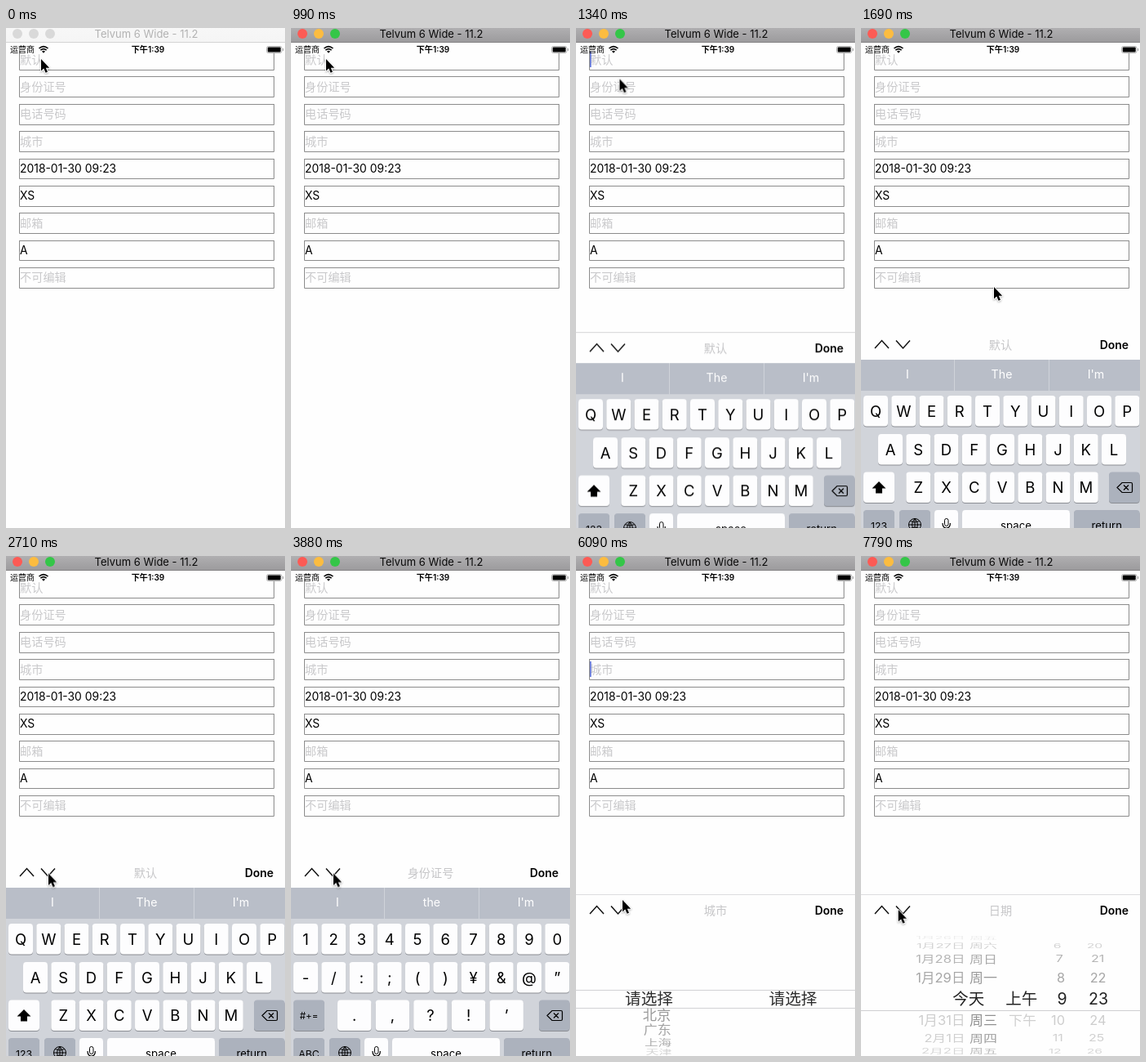
Recreate the animation shown at these times as an HTML page. Size 342 by 612 pixels, loop 8000 ms.

```html
<!DOCTYPE html>
<html lang="zh-CN">
<head>
<meta charset="utf-8">
<title>Form keyboards</title>
<style>
  html, body { margin: 0; width: 100%; height: 100%; overflow: hidden; background: #fff; }
  svg { display: block; width: 342px; height: 612px; overflow: hidden; }
  text { font-family: Inter, "Noto Sans CJK SC", "Noto Sans CJK", sans-serif; white-space: pre; }
</style>
</head>
<body>
<svg id="stage" viewBox="0 0 342 612"></svg>
<script>
const LOOP = 8000;
const stage = document.getElementById('stage');

// ---------- drawing helpers ----------
function add(parent, tag, attrs = {}) {
  const node = document.createElementNS('http://www.w3.org/2000/svg', tag);
  for (const key in attrs) node.setAttribute(key, attrs[key]);
  parent.appendChild(node);
  return node;
}
const group = (parent = stage) => add(parent, 'g');
const box = (p, x, y, width, height, fill, more) =>
  add(p, 'rect', { x, y, width, height, fill, ...more });
const stroke = (p, d, color = '#000', width = 1.2) =>
  add(p, 'path', { d, fill: 'none', stroke: color, 'stroke-width': width });

// Text placed by its vertical centre; squash flattens it like a wheel row.
function label(p, x, cy, str, size, fill = '#000', more = {}, squash = 1) {
  const node = add(p, 'text', {
    x: 0, y: size * 0.37, 'font-size': size, fill, 'text-anchor': 'middle',
    transform: `translate(${x} ${cy}) scale(1 ${squash})`, ...more
  });
  node.textContent = str;
  return node;
}

// ---------- timing helpers ----------
// rows: [ms, value, easing to the next row]
function play(node, prop, rows, easing = 'linear') {
  const all = [[0, rows[0][1]], ...rows, [LOOP, rows[rows.length - 1][1]]];
  node.animate(all.map(([ms, value, ease]) =>
    ({ offset: ms / LOOP, [prop]: value, easing: ease || easing })),
    { duration: LOOP, iterations: Infinity });
}
const show = (node, from, to = LOOP) =>
  play(node, 'opacity', to < LOOP ? [[0, 0], [from, 1], [to, 0]] : [[0, 0], [from, 1]], 'step-end');

// ---------- form ----------
const ROWS = [
  ['默认'], ['身份证号'], ['电话号码'], ['城市'], ['2018-01-30 09:23', 1],
  ['XS', 1], ['邮箱'], ['A', 1], ['不可编辑']
];
const PITCH = 33.36;
const rowTop = i => Math.round(26.1 + PITCH * i);
const rowEnd = i => Math.round(50.8 + PITCH * i);

box(stage, 0, 0, 342, 612, '#fefefe');
ROWS.forEach(([str, filled], i) => {
  // The first field's top edge lies under the status bar.
  stroke(stage, `M16.5 ${rowTop(i)} V${rowEnd(i) + 0.5} H328.5 V${rowTop(i)}` +
    (i ? `M16 ${rowTop(i) + 0.5} H329` : ''), '#8c8c8c', 1);
  label(stage, 17, 38.3 + PITCH * i, str, filled ? 13.9 : 14.2, filled ? '#000' : '#c9c9cb',
    { 'text-anchor': 'start' });
});

function caret(row, x, steps) {
  const node = box(stage, x, rowTop(row) + 3, 1.7, 19, '#6478dc', { opacity: 0 });
  play(node, 'opacity', steps);
}
caret(0, 17, [[1046, 0], [1047, 1], [1550, 1], [1660, 0], [1930, 0], [2040, 1],
  [2460, 1], [2570, 0], [2770, 0], [2829, 0.6], [2830, 0]]);
caret(1, 17, [[2829, 0], [2830, 1], [2950, 1], [3060, 0], [3300, 0], [3410, 1], [3770, 1], [3880, 0]]);
caret(2, 17, [[4229, 0], [4230, 1], [4830, 1], [4950, 0], [5280, 0], [5389, 1], [5390, 0]]);
caret(3, 17, [[5389, 0], [5390, 1], [6090, 1], [6260, 0], [6540, 0], [6650, 1], [6979, 1], [6980, 0]]);
caret(4, 134.5, [[6979, 0], [6980, 1], [7480, 1], [7620, 0]]);

// ---------- status bar ----------
label(stage, 5, 26.5, '运营商', 10, '#000', { 'text-anchor': 'start' });
label(stage, 174, 26.5, '下午1:39', 10.1, '#000', { 'font-weight': 600 });
stroke(stage, 'M40.5 25 Q46 20.2 51.5 25 M42.4 27.2 Q46 24 49.6 27.2', '#000', 1.6);
add(stage, 'path', { d: 'M44 28.6 Q46 27 48 28.6 L46 30.8Z' });
box(stage, 319.5, 22.5, 18.5, 8, '#fff', { rx: 2, stroke: '#b4b4b4' });
box(stage, 320.7, 23.6, 16, 5.8, '#000', { rx: 1 });
box(stage, 339, 25, 1.3, 3, '#b4b4b4');

// ---------- keyboards ----------
const KEYBED = '#d1d4da', GREY = '#acb2bd';

function toolbar(p, y, title, fill = '#fefefe') {
  box(p, 0, y, 342, 612 - y + 300, fill);
  stroke(p, `M17 ${y + 24} L25.5 ${y + 14.5} L34 ${y + 24}`, '#111', 1.5);
  stroke(p, `M43 ${y + 14.5} L51.5 ${y + 24} L60 ${y + 14.5}`, '#111', 1.5);
  label(p, 171, y + 19.5, title, 14.2, '#c6c6c8');
  label(p, 328, y + 19.7, 'Done', 13.9, '#000', { 'font-weight': 600, 'text-anchor': 'end' });
}
const rule = (p, y, color = '#d6d6d8') => box(p, 0, y, 342, 1, color);

function key(p, x, y, w, h, str = '', size = 18.5, fill = '#fdfdfe') {
  box(p, x, y + 1, w, h, '#8b8e94', { rx: 4 });
  box(p, x, y, w, h, fill, { rx: 4 });
  if (str) label(p, x + w / 2, y + h / 2, str, size);
}
const keyRow = (p, keys, x, y, pitch, w) =>
  [...keys].forEach((c, i) => key(p, x + i * pitch, y, w, 37.5, c));

function backspace(p, x, y) {
  stroke(p, `M${x - 9} ${y} l6 -6 h11 q1.5 0 1.5 1.5 v9 q0 1.5 -1.5 1.5 h-11z` +
    `M${x - 1} ${y - 3} l6 6 m0 -6 l-6 6`);
}

function textKeys(title, words, mode) {
  const p = group();
  toolbar(p, 368, title);
  box(p, 0, 406, 342, 38, '#b9bec8');
  box(p, 0, 444, 342, 300, KEYBED);
  [114, 230].forEach(x => box(p, x, 406, 1, 38, '#cfd3da'));
  words.forEach((word, i) => label(p, 57 + 115.5 * i, 423.5, word, 14.2, '#fff'));
  key(p, 304, 543.5, 37.5, 37.5, '', 0, GREY);
  backspace(p, 323, 562.5);
  key(p, 3, 590, 38, 38, mode, 12.3, GREY);
  key(p, 47, 590, 38, 38, '', 0, GREY);
  stroke(p, 'M58.5 608 a7.5 7.5 0 1 0 15 0 a7.5 7.5 0 1 0 -15 0 h15 M66 600.5 v15' +
    'M66 600.5 q-7 7.5 0 15 q7 -7.5 0 -15 M60 603.5 q6 3 12 0 M60 612.5 q6 -3 12 0', '#000', 1);
  key(p, 90, 590, 29, 38);
  box(p, 102.5, 600.5, 4.5, 9, 'none', { rx: 2.2, stroke: '#000' });
  stroke(p, 'M100 606 q0 6 4.7 6 q4.7 0 4.7 -6 M104.7 612 v4');
  key(p, 124, 590, 132, 38, 'space', 13.2);
  key(p, 261, 590, 80.5, 38, 'return', 13.2, GREY);
  return p;
}

const letters = textKeys('默认', ['I', 'The', "I'm"], '123');
keyRow(letters, 'QWERTYUIOP', 3, 450, 34.25, 30);
keyRow(letters, 'ASDFGHJKL', 21, 497, 34.25, 30);
key(letters, 3, 543.5, 38, 37.5);
keyRow(letters, 'ZXCVBNM', 55.3, 543.5, 34.25, 30);
add(letters, 'path', { d: 'M22 555 l8.5 8.5 h-4.5 v6 h-8 v-6 h-4.5z' });
const edge = rule(letters, 368);
show(edge, 1047, 1467);
show(letters, 1047, 2830);
play(letters, 'transform', [
  [1047, 'translate(0px, 244px)', 'cubic-bezier(.38,.7,.125,1)'],
  [1467, 'translate(0px, 0px)']
]);

const signs = textKeys('身份证号', ['I', 'the', "I'm"], 'ABC');
keyRow(signs, '1234567890', 3, 450, 34.25, 30);
keyRow(signs, '-/:;()¥&@”', 3, 497, 34.25, 30);
key(signs, 3, 543.5, 38, 37.5, '#+=', 11.5, GREY);
keyRow(signs, '.,?!’', 57, 543.5, 46.6, 41.5);
show(signs, 2830, 4230);

const pad = group();
toolbar(pad, 405, '电话号码', '#f8f8f8');
rule(pad, 405);
box(pad, 0, 443, 342, 300, KEYBED);
['', 'ABC', 'DEF', 'GHI', 'JKL', 'MNO', 'PQRS', 'TUV', 'WXYZ'].forEach((abc, i) => {
  const x = 5 + 113.5 * (i % 3), y = 448 + 47 * Math.floor(i / 3);
  key(pad, x, y, 108.5, 41);
  label(pad, x + 54, y + 15, i + 1, 21.5);
  label(pad, x + 55, y + 31.5, abc, 7.8, '#000', { 'font-weight': 600, 'letter-spacing': 1.3 });
});
key(pad, 118.5, 589, 108.5, 41);
label(pad, 172.5, 607.5, '0', 21.5);
stroke(pad, 'M36 607 h12 m-6 -6 v12 M57 601 v12 m-5.5 -9 l11 6 m0 -6 l-11 6' +
  'M68 601.5 l-2 11 m7 -11 l-2 11 M65 605 h11 m-12 4.5 h11', '#222', 1.1);
backspace(pad, 288, 608);
show(pad, 4230, 5390);

// ---------- wheels ----------
const city = group();
toolbar(city, 414, '城市');
rule(city, 414, '#dddddf');
[531, 553].forEach(y => rule(city, y, '#d2d2d4'));
[89.5, 266].forEach(x => label(city, x, 542, '请选择', 19.7, '#2c2c2c'));
[['北京', 562, 17.3, '#9a9a9a', 0.97], ['广东', 580, 17, '#a3a3a3', 0.86],
 ['上海', 596, 16.6, '#b0b0b0', 0.68], ['天津', 607, 16, '#d2d2d2', 0.5]]
  .forEach(([str, y, size, color, squash], i) =>
    label(city, 99 + i * 0.8, y, str, size, color, {}, squash));
show(city, 5390, 6980);

const dates = group();
toolbar(dates, 414, '日期');
rule(dates, 414, '#dddddf');
rule(dates, 556, '#cfcfd1');
const END = { 'text-anchor': 'end' };
// day, weekday, y, squash, day colour, weekday colour
[['1月26日', '周五', 467.5, 0.25, '#ececec', '#ececec'],
 ['1月27日', '周六', 477, 0.45, '#d2d2d2', '#d2d2d2'],
 ['1月28日', '周日', 493, 0.75, '#b4b4b4', '#aaaaaa'],
 ['1月29日', '周一', 516, 0.95, '#a6a6a6', '#999999'],
 ['', '', 542, 1, '#222'],
 ['1月31日', '周三', 568, 0.95, '#cdcdcd', '#8f8f8f'],
 ['2月1日', '周四', 590, 0.75, '#cfcfcf', '#a0a0a0'],
 ['2月2日', '周五', 606, 0.5, '#d6d6d6', '#bdbdbd']
].forEach(([day, week, y, squash, color, dark], i) => {
  const mid = i === 4, size = mid ? 19.5 : 17;
  const lean = Math.abs(i - 4);
  if (mid) {
    label(dates, 151.3, y, '今天', size, color, END);
    label(dates, 196.7, y, '上午', size, color);
  } else {
    label(dates, 127.5, y, day, 16.6, color, END, squash);
    label(dates, 167, y, week, size, dark, END, squash);
  }
  if (i) {
    const num = mid ? 19.5 : 16.6 - lean * 0.3;
    const drift = lean > 1 ? (lean - 1) * 2.2 : 0;
    label(dates, (mid ? 252.5 : 250) - drift, y, i + 5, num, color, END, squash);
    label(dates, (mid ? 303 : 300.5) - drift, y, i + 19, num, color, END, squash);
  }
});
label(dates, 198, 568, '下午', 17, '#cfcfcf', {}, 0.95);
show(dates, 6980);

// ---------- window bar ----------
function windowBar(stops, line, ink, lights) {
  const p = group();
  const id = 'bar' + ink.slice(1);
  const grad = add(p, 'linearGradient', { id, x1: 0, y1: 0, x2: 0, y2: 1 });
  stops.forEach((color, i) => add(grad, 'stop', { offset: i, 'stop-color': color }));
  box(p, 0, 0, 342, 17, `url(#${id})`);
  rule(p, 17, line);
  lights.forEach((fill, i) => add(p, 'circle', { cx: 14 + 20 * i, cy: 7, r: 6, fill }));
  label(p, 172, 7.3, 'Telvum 6 Wide - 11.2', 13, ink);
  return p;
}
windowBar(['#f7f7f7', '#f5f5f5'], '#d3d3d3', '#b2b2b2', ['#d9d9d9', '#d9d9d9', '#d9d9d9']);
show(windowBar(['#b0afb1', '#9c9b9d'], '#858486', '#0a0a0a', ['#fc5b55', '#fcbc40', '#34c648']), 900);

// ---------- pointer ----------
const pointer = add(stage, 'path', {
  d: 'M0 0 V14.6 L3.3 11.6 L5.6 16.8 L8 15.8 L5.8 10.7 H10.2Z',
  stroke: '#fff', 'stroke-width': 1.8, 'paint-order': 'stroke', 'stroke-linejoin': 'round',
  style: 'filter: drop-shadow(0 1px 1px rgba(0, 0, 0, .3))'
});
play(pointer, 'transform', [
  [1250, 43, 38, 'ease-in-out'], [1690, 163, 317],
  [1930, 163, 317, 'ease-in'], [2100, 170, 327, 'ease-in-out'], [2710, 52, 388.5],
  [4890, 52, 388.5, 'ease-in-out'], [5160, 52, 421],
  [5400, 52, 421, 'ease-out'], [5600, 57, 421],
  [6150, 57, 421, 'ease-in-out'], [6350, 66, 428, 'ease-in-out'], [6800, 44.5, 431.5],
  [7280, 44.5, 431.5, 'ease-out'], [7500, 45.7, 433]
].map(([ms, x, y, ease]) => [ms, `translate(${x}px, ${y}px)`, ease]));
</script>
</body>
</html>
```
